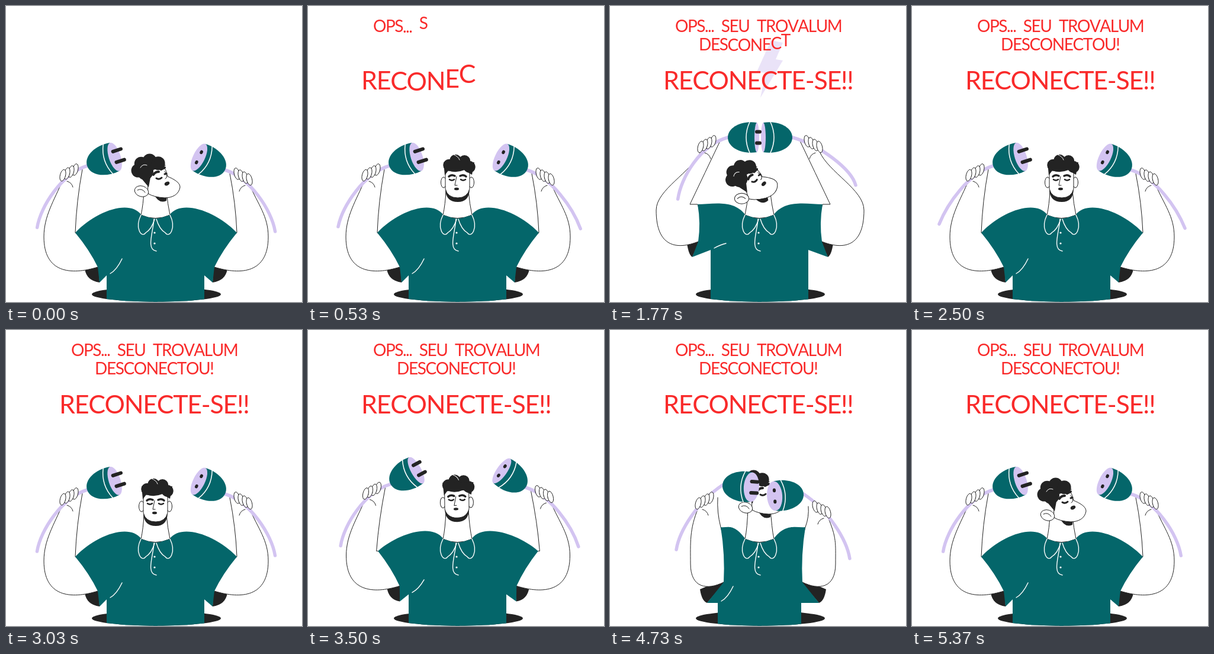
These frames come from a looping animation (500x500 px, 5410 ms). An HTML page with a canvas:

```html
<!DOCTYPE html>
<html lang="pt">
<head>
<meta charset="utf-8">
<style>
html, body { margin: 0; width: 100%; height: 100%; overflow: hidden; background: #fff; }
canvas { display: block; width: 500px; height: 500px; }
</style>
</head>
<body>
<canvas id="stage" width="500" height="500"></canvas>
<script>
const c = document.getElementById('stage').getContext('2d');
const LOOP = 5410, AXIS = 505;
const TEAL = '#04666a', INK = '#232323', LILAC = '#d3c4f1', RED = '#f92a2a';

// Left arm joints; every pose blends these three.
const REST = { plug: [137, 270], shoulder: [117, 383], elbow: [64, 390], sleeve: [155, 441] };
const UP = { plug: [199, 222], shoulder: [148, 335], elbow: [78, 345], sleeve: [149, 398] };
const TUCKED = { plug: [190, 262], shoulder: [187, 333], elbow: [136, 395], sleeve: [192, 426] };

const rad = deg => deg * Math.PI / 180;
const span = (t, a, b) => Math.max(0, Math.min(1, (t - a) / (b - a)));
const ease = x => x * x * (3 - 2 * x);
const pulse = (t, a, b, d, e) => ease(span(t, a, b)) - ease(span(t, d, e));
const bump = (t, mid, width) => Math.exp(-(((t - mid) / width) ** 2));

function poseAt(t) {
  const fling = pulse(t, 4740, 4860, 4860, 5130);
  return {
    lift: pulse(t, 1380, 1690, 2240, 2430) + .17 * pulse(t, 600, 1000, 1150, 1380)
      + .2 * pulse(t, 3050, 3450, 3520, 3680) + .25 * fling,
    tuck: pulse(t, 3520, 3680, 4740, 4830) - .45 * fling,
    lean: pulse(t, 600, 1000, 1120, 1350)
  };
}

// Both sides use left-hand coordinates; the right one is drawn mirrored.
function sideOf({ lift, tuck, lean }, t, right) {
  const s = {};
  for (const name in REST) {
    const mix = (i, k) => REST[name][i] + k * (UP[name][i] - REST[name][i])
      + tuck * (TUCKED[name][i] - REST[name][i]);
    const x = mix(0, lift * lift), y = mix(1, lift);
    s[name] = right ? [x - 2 - 10 * tuck - 8 * lean, y] : [x + 8 * lean, y];
  }
  if (right) s.plug[1] += 7 * (1 - lift) + 8 * tuck + 6 * lean;
  const [px, py] = s.plug, [tx, ty] = s.sleeve;
  s.hand = [px - 27 - 5 * lift, py + 13 + 15 * tuck];
  s.hem = [tx + 3 - 13 * lift - 31 * tuck, ty + 26 + 9 * tuck];
  s.armpit = [170 + 12 * Math.max(0, tuck), s.hem[1] - 12 + 12 * Math.max(0, tuck)];
  s.tilt = -18 + 18 * lift + 22 * tuck - 24 * Math.sin(Math.PI * lift) + (right ? 8 * (lift + tuck - 1) : 0);
  const swing = right ? 20 * bump(t, 330, 150) + 14 * lift : 17 * bump(t, 820, 170) + 6 * lean;
  s.cord = 39 + swing + 4 * bump(t, 2560, 250) + 17 * bump(t, 4870, 90) - 5 * tuck;
  return Object.assign(s, { lift, tuck });
}

function shape(d, fill, stroke, width = 1) {
  const path = new Path2D(d);
  if (fill) { c.fillStyle = fill; c.fill(path); }
  if (stroke) { c.strokeStyle = stroke; c.lineWidth = width; c.stroke(path); }
}

function oval(x, y, rx, ry, fill, rot = 0, stroke) {
  c.beginPath();
  c.ellipse(x, y, rx, ry, rot, 0, 7);
  c.fillStyle = fill;
  c.fill();
  if (stroke) { c.strokeStyle = stroke; c.lineWidth = 1; c.stroke(); }
}

function mirrored(on, axis, draw) {
  c.save();
  if (on) { c.translate(axis, 0); c.scale(-1, 1); }
  draw();
  c.restore();
}

function arm({ hand: [hx, hy], shoulder: [sx, sy], elbow: [ox, oy], sleeve: [tx, ty], hem: [kx, ky], lift, tuck }) {
  const qx = kx - 25 + 16 * lift + 13 * tuck, qy = ky - 23;
  shape(`M${qx} ${qy}L${tx + 2} ${ty - 6}V${ty}L${kx} ${ky}Q${qx + 3} ${ky - 3} ${qx} ${qy}`, INK);
  const ix = hx + 19, iy = hy - 7, zx = hx - 14, zy = hy + 11, cx = sx - 13 * lift;
  shape(`M${ix} ${iy}Q${(ix + cx) / 2 - 4 * (1 - lift)} ${(iy + sy) / 2} ${cx} ${sy}H${sx}L${tx + 14} ${ty - 18}L${tx} ${ty}
    C${(tx + ox) / 2} ${ty + 14} ${ox} ${ty + 10} ${ox} ${oy}
    C${ox} ${oy - 35} ${zx - 15} ${zy + 35} ${zx} ${zy}`, '#fff', INK);
}

function shirtHalf({ shoulder: [sx, sy], sleeve: [tx, ty], hem: [kx, ky], armpit: [ax, ay] }) {
  shape(`M228 352C208 326 ${sx + .3 * (228 - sx)} ${sy - .75 * (sy - 335)} ${sx} ${sy}
    Q${(sx + tx) / 2 + 5} ${(sy + ty) / 2} ${tx} ${ty}L${kx} ${ky}L${ax} ${ay}V500H256V352Z`, TEAL);
}

function neck(dy) {
  shape(`M233 ${312 + dy}Q232 335 228 353Q252 364 277 353Q273 335 271 ${312 + dy}`, '#fff', INK);
}

function collar() {
  for (const right of [false, true]) mirrored(right, AXIS, () =>
    shape('M228 353C217 375 229 393 236 383Q246 377 251 360', TEAL, '#fff', 1.4));
  shape('M250 360C249 380 236 412 254 414', null, '#fff', 1.4);
  for (const y of [383, 401]) oval(251, y, 1.6, 1.6, '#fff');
}

function curls(x, y, rx, ry, from, to, r) {
  for (let i = 0; i < 4; i++) {
    const a = Math.PI * (from + (to - from) * i / 3);
    oval(x + rx * Math.cos(a), y + ry * Math.sin(a), r, r, INK);
  }
}

function sideHead() {
  shape('M250 318Q258 335 271 329L272 318Z', INK);
  shape('M240 280L266 270Q272 280 273 288C283 292 294 298 294 306C292 318 282 324 268 324Q250 323 240 317Z', '#fff', INK);
  curls(243, 277, 20, 16, .98, 1.75, 11.5);
  oval(235, 279, 14, 15, INK);
  shape('M226 288L250 262L270 269Q258 277 248 276Q243 291 241 306Z', INK);
  shape('M227 273Q231 266 238 269', null, '#fff');
  oval(229, 313, 12, 9, '#fff', .3, INK);
  shape('M222 311Q230 307 235 315', null, INK);
  shape('M249 285Q252 280 258 280M262 276L268 273', null, INK, 4);
  shape('M254 291Q259 294 263 290M268 284L271 283', null, INK, 3);
  shape('M268 279Q275 289 269 292', null, INK);
  oval(272, 300, 4.5, 3, INK, -.5);
}

function frontHead() {
  for (const x of [229, 276]) oval(x, 298, 4.5, 9, '#fff', 0, INK);
  shape('M232 310Q233 331 253 331Q272 331 273 310Z', INK);
  shape('M232 277V309Q236 324 253 324Q269 324 273 309V277Z', '#fff', INK);
  curls(255, 274, 18, 14, 1.12, 1.95, 10);
  shape('M229 264H281L277 285Q268 280 264 277Q250 283 237 278L231 286Z', INK);
  shape('M246 251Q254 254 256 260', null, '#fff');
  for (const right of [false, true]) mirrored(right, AXIS, () => {
    shape('M238 288Q242 284 248 287', null, INK, 3.5);
    shape('M239 293Q243 296 247 293', null, INK, 2.5);
  });
  shape('M251 288L248 303H252', null, INK);
  oval(251, 309, 4, 2.2, INK);
}

function head({ lift, tuck }, t) {
  const front = t > 2270 && t < 4500 || t > 520 && t < 600 || t > 1330 && t < 1420;
  c.save();
  c.translate(252 - 4 * lift, 325 + headRise(lift, tuck));
  c.rotate(rad(-17 * lift * lift));
  c.translate(-252, -325);
  if (front) frontHead();
  else mirrored(t >= 600 && t <= 1330, 512, sideHead);
  c.restore();
}

const headRise = (lift, tuck) => 5 * lift - 13 * Math.sin(Math.PI * lift) - 13 * Math.max(0, tuck);

function hand({ plug: [px, py], hand: [hx, hy], cord }) {
  const ex = px - 134 * Math.sin(rad(cord)), ey = py + 134 * Math.cos(rad(cord));
  const bend = .1 + .03 * (cord - 39) * (hx < 130);
  shape(`M${px} ${py}C${hx - 15} ${hy} ${ex + bend * (hx - ex)} ${ey - .4 * (ey - hy)} ${ex} ${ey}`, null, LILAC, 5.5);
  for (let i = 3; i >= 0; i--)
    oval(hx - 14 + 7 * i, hy + 3 - 3.2 * i, 4.6, 10, '#fff', .25, INK);
  shape(`M${hx - 7} ${hy + 13}Q${hx + 1} ${hy + 15} ${hx + 3} ${hy + 23}`, null, INK);
}

function plug({ plug: [px, py], tilt, lift, tuck }, socket) {
  c.save();
  c.translate(px, py);
  c.rotate(rad(tilt));
  shape('M49 -25C25 -29 0 -18 0 0C0 18 25 29 49 25Z', TEAL);
  shape('M37 -26Q25 0 37 26', null, '#fff', 1.5);
  oval(49, 0, 10 - 6 * lift + 3 * tuck, 25, LILAC);
  for (const y of [-9.5, 9.5]) {
    if (!socket) shape(`M49 ${y}h${14 - 9 * lift - 4 * tuck}`, null, INK, 6);
    else if (lift < .9) oval(49, y, 2.6, 3.4, INK);
  }
  c.restore();
}

function figure(t) {
  const leaving = t < 4300;
  const open = leaving ? 1 - span(t, 3930, 4065) : span(t, 4600, 4700);
  if (!open) return;
  const rx = 109 * open, ry = 12.5 * Math.sqrt(open);
  oval(254, 487, rx, ry, INK);
  const sunk = (leaving ? span(t, 3620, 3930) : 1 - span(t, 4630, 4725)) ** 2;
  if (sunk == 1) return;

  const pose = poseAt(t), sides = [sideOf(pose, t, false), sideOf(pose, t, true)];
  const each = draw => sides.forEach((s, i) => mirrored(i, AXIS, () => draw(s)));
  c.save();
  c.beginPath();
  c.rect(0, 0, 500, 487);
  c.ellipse(254, 487, rx, ry, 0, 0, Math.PI);
  c.clip();
  c.translate(0, 290 * sunk);
  each(arm);
  each(shirtHalf);
  const [ax, ay] = sides[0].armpit;
  shape(`M${ax + 6} ${ay - 3}q11 -6 20 ${-25 + 17 * pose.lift}`, null, '#fff', 1.4);
  neck(headRise(pose.lift, pose.tuck));
  collar();
  head(pose, t);
  each(hand);
  for (const i of [1, 0]) mirrored(i, AXIS, () => plug(sides[i], i));
  c.restore();
}

function bolt(t) {
  c.globalAlpha = .6 * pulse(t, 1725, 1790, 2120, 2240) * (.75 + .25 * Math.cos((t - 1770) / 45));
  shape('M272 58L292 62L280 90L292 92L254 155L263 113L248 111Z', LILAC);
  c.globalAlpha = 1;
}

// Letters appear one by one and drop onto the baseline with a soft bounce.
function typed(text, x, y, size, spacing, start, step, t) {
  c.font = `${size}px Lato, sans-serif`;
  c.fillStyle = RED;
  [...text].forEach((ch, i) => {
    const age = t - start - i * step;
    if (age > 0) {
      const drop = -.39 * size * Math.exp(-age / 120) * Math.cos(age / 100);
      c.fillText(ch, x, y + drop);
    }
    x += ch == ' ' ? size * .45 : c.measureText(ch).width + spacing;
  });
}

function frame(t) {
  c.fillStyle = '#fff';
  c.fillRect(0, 0, 500, 500);
  c.lineCap = c.lineJoin = 'round';
  figure(t);
  bolt(t);
  typed('OPS... SEU TROVALUM', 110, 44, 28, -1.5, 30, 63, t);
  typed('DESCONECTOU!', 150, 75, 28, -1.4, 30 + 19 * 63, 63, t);
  typed('RECONECTE-SE!!', 90, 141, 43, -1.3, 30, 77, t);
}

const begin = performance.now();
(function tick() {
  frame((performance.now() - begin) % LOOP);
  requestAnimationFrame(tick);
})();
</script>
</body>
</html>
```
